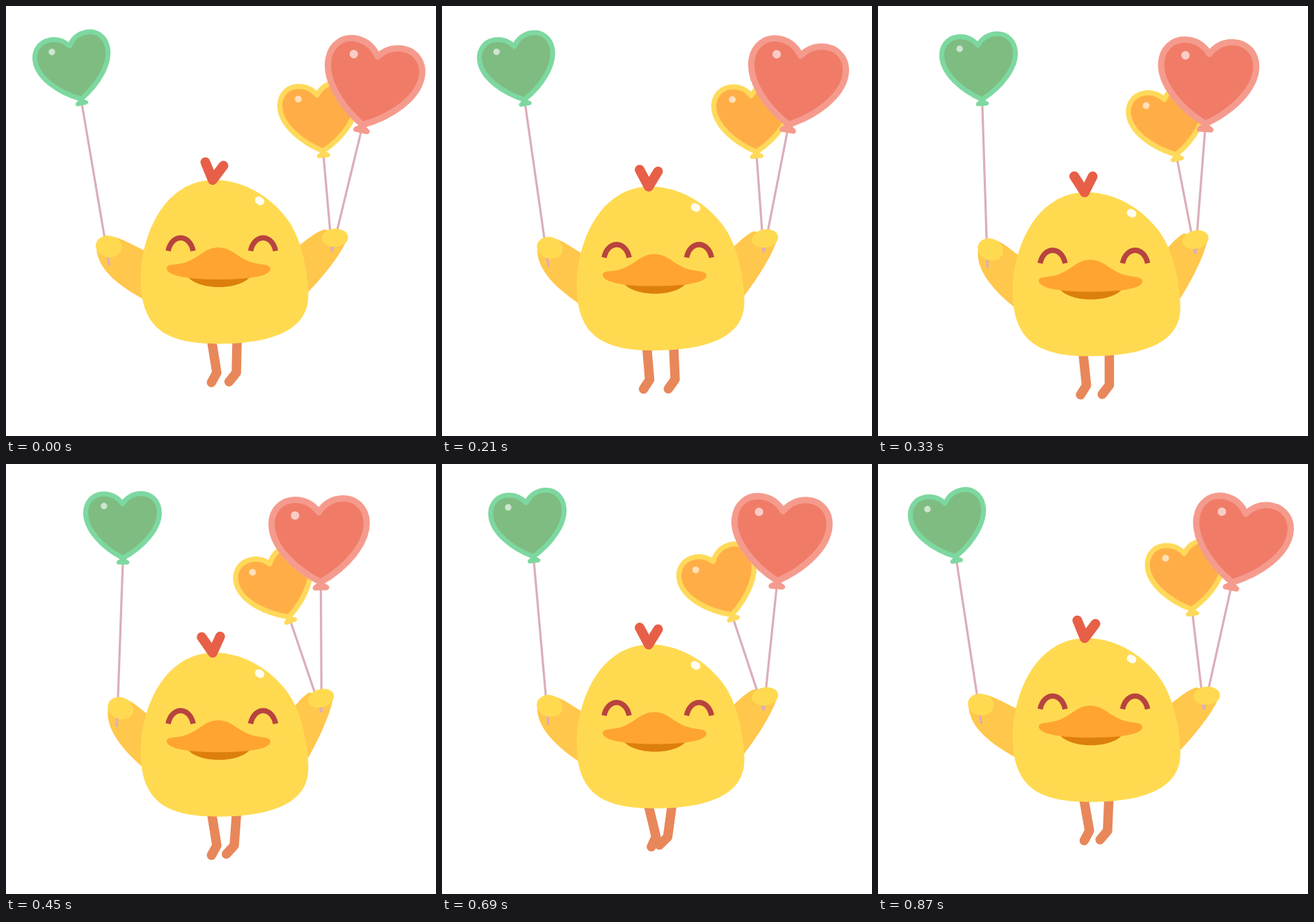
An HTML page that plays this animation: 618 by 618 pixels, repeating every 0.9 s.

```html
<!DOCTYPE html>
<html lang="en">
<head>
<meta charset="utf-8">
<title>Chick with balloons</title>
<style>
  html, body { margin: 0; width: 100%; height: 100%; overflow: hidden; background: #fff; }
  svg { display: block; width: 100%; height: 100%; }
  .line { fill: none; stroke-linecap: round; stroke-linejoin: round; }
  .string { stroke: #dbaeb8; stroke-width: 3.2; }
  .arm { fill: #ffc74b; }
  .skin { fill: #ffda51; }
  .leg { stroke: #e8875a; stroke-width: 13.5; }
  .eye { fill: none; stroke: #b8433f; stroke-width: 7.6; }
  .heart { stroke-width: 7; stroke-linejoin: round; }
  .knot { stroke-width: 6; stroke-linejoin: round; }
  .glint { fill: #fff; opacity: .62; }
  .green { fill: #7fbc82; stroke: #7dd8a0; }
  .amber { fill: #ffae47; stroke: #ffd95a; }
  .red { fill: #f07c68; stroke: #f59b8d; }
  .green .knot { fill: #7dd8a0; }
  .amber .knot { fill: #ffd95a; }
  .red .knot { fill: #f59b8d; }
</style>
</head>
<body>
<svg viewBox="0 0 618 618">
  <defs>
    <g id="balloon">
      <path class="heart" d="M0-81C7-91 17-95.5 27-95.5C42-95.5 53-84 53-68C53-45 30-19 0-3C-30-19-53-45-53-68C-53-84-42-95.5-27-95.5C-17-95.5-7-91 0-81Z"/>
      <circle class="glint" cx="-26.5" cy="-78" r="4.7" stroke="none"/>
    </g>
    <path id="knot" d="M-6.2 3.2L0-1L6.2 3.2Z"/>
    <path id="eye" class="eye" d="M233 352C238 327 264 327 269 352"/>
  </defs>

  <g id="chick">
    <g id="armL">
      <path class="arm" d="M147 331C158 331 168 336 178 341L202 353L235 390L225 433L196 420.500C155 398 130 374 130 346Z"/>
      <g id="green"></g>
      <ellipse class="skin" cx="147.700" cy="345.700" rx="18.800" ry="15.500" transform="rotate(10 147.700 345.700)"/>
    </g>
    <g id="armR">
      <path class="arm" d="M405 356L424 342C436 333 447 324 458 321L491 333C484 354 455 390 434 411.500L405 440Z"/>
      <g id="amber"></g>
      <g id="red"></g>
      <ellipse class="skin" cx="472.700" cy="333" rx="19" ry="13" transform="rotate(-3 472.700 333)"/>
    </g>
    <path id="legL" class="line leg" d="M293.300 467L303 527L295.300 541"/>
    <path id="legR" class="line leg" d="M332.400 467L331 527L320.500 540"/>
    <path class="skin" d="M300 250C345 250 388 279 410 315C428 346 435 392 434.500 417C434 468 378 485.500 304 485.500C228 485.500 193.500 462 193.500 391C193.500 338 222 250 300 250Z"/>
    <path id="crest" class="line" stroke="#e85f48" stroke-width="14" d="M286.500 224.500L297 250L312.500 229.500"/>
    <rect x="357.500" y="274.500" width="14" height="11" rx="5.500" fill="#fffdf2" transform="rotate(32 364.500 280)"/>
    <use href="#eye"/>
    <use href="#eye" x="118.500"/>
    <path fill="#dd7f0c" d="M259 386C272 410 340 410 353 386Z"/>
    <path fill="#ffa430" d="M305 347C328 347 335 368 366 371C376 372 380 374 380 378C380 388 350 393 305 393C262 393 231 388 231 377C231 372 238 372 247 371C276 367 283 347 305 347Z"/>
  </g>
</svg>
<script>
  const LOOP = 900;
  const $ = id => document.getElementById(id);
  const set = (id, value) => $(id).setAttribute('transform', value);

  // Sway in degrees: mean, then a cosine and a sine weight per harmonic.
  const balloons = [
    { id: 'green', x: 148.5, y: 373, length: 239.7, size: 1, tilt: -2.6,
      sway: [-4.868, -5.991, -1.894, 1.093, -.649, .166, -.456] },
    { id: 'amber', x: 468.5, y: 353, length: 142, size: 1.04, tilt: -1,
      sway: [-11.91, 6.67, 7.24, -.013, .071, .153, .07] },
    { id: 'red', x: 468.5, y: 353, length: 183.5, size: 1.29, tilt: -1.3,
      sway: [7.246, 6.939, 2.843, -.596, .494, .011, .348] }
  ];

  for (const b of balloons) {
    $(b.id).innerHTML =
      `<path class="string" d="M0 0V${-b.length}"/>
       <g class="${b.id}" transform="translate(0 ${-b.length}) rotate(${b.tilt}) scale(${b.size})">
         <use href="#balloon"/><use href="#knot" class="knot"/>
       </g>`;
  }

  function swayAt(k, a) {
    let sum = k[0];
    for (let n = 1; n <= 3; n++)
      sum += k[2 * n - 1] * Math.cos(n * a) + k[2 * n] * Math.sin(n * a);
    return sum;
  }

  function draw(now) {
    const a = (now % LOOP) / LOOP * 2 * Math.PI;
    const sin = Math.sin(a), cos = Math.cos(a);
    const dip = (1 - cos) / 2;
    const left = 12.8 * dip, right = -14 * dip;

    set('chick', `translate(0 ${21.3 * dip})`);
    set('armL', `rotate(${left} 227.5 413.5)`);
    set('armR', `rotate(${right} 391 405.5)`);
    set('crest', `rotate(${-12.5 * dip} 297 250)`);
    set('legL', `rotate(${4.4 * sin} 293.3 467)`);
    set('legR', `rotate(${2.86 * dip - 5.13 * sin} 332.4 467)`);

    for (const b of balloons) {
      const arm = b.id === 'green' ? left : right;
      set(b.id, `translate(${b.x} ${b.y}) rotate(${swayAt(b.sway, a) - arm})`);
    }
    requestAnimationFrame(draw);
  }
  draw(performance.now());
</script>
</body>
</html>
```
